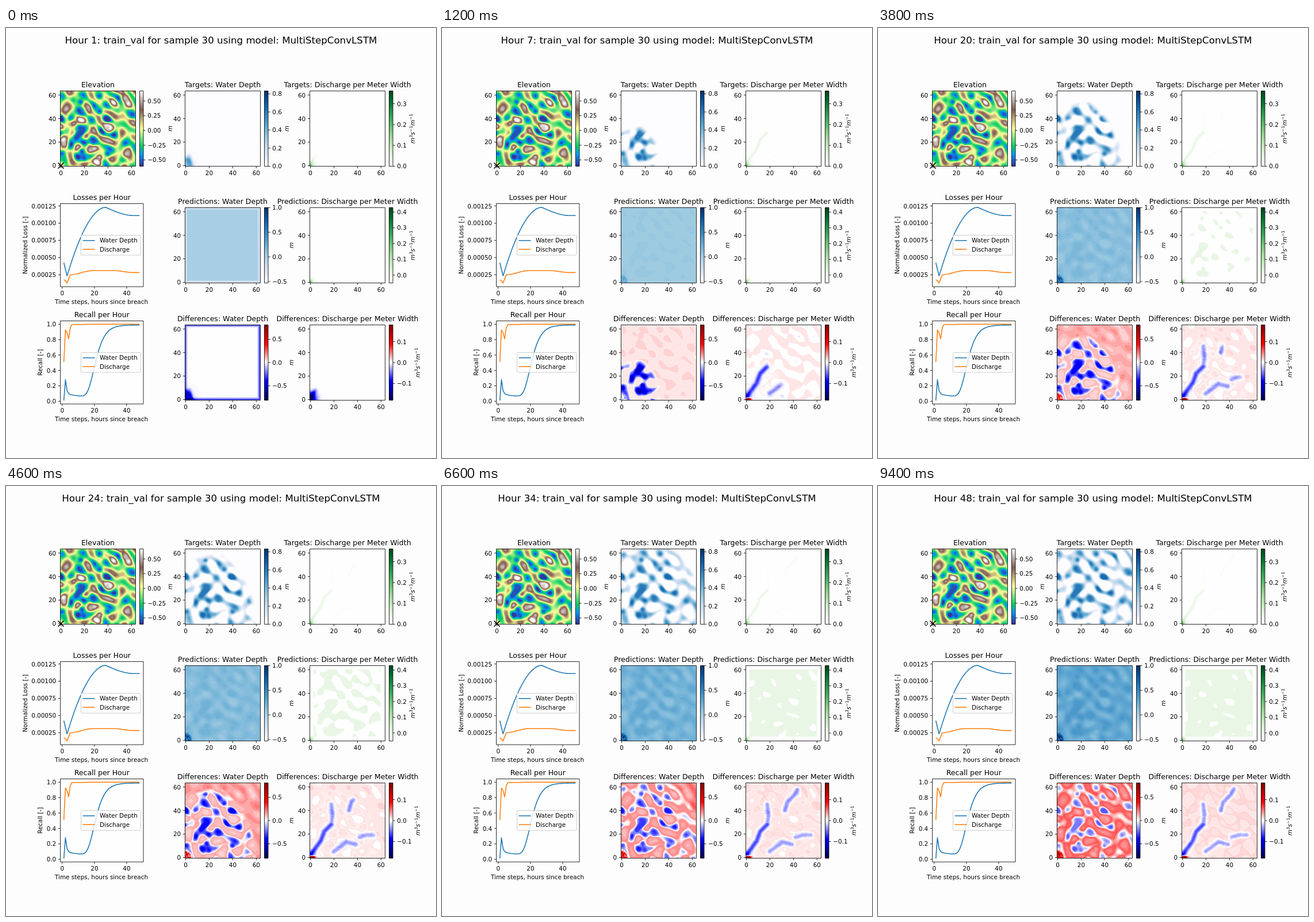
Write an HTML page with a canvas that moves like this. It is 748 by 748 pixels and loops after 9.6 s.

```html
<!DOCTYPE html>
<html lang="en">
<head>
<meta charset="utf-8">
<style>
html, body { margin: 0; width: 100%; height: 100%; overflow: hidden; background: #fdfdfd; }
canvas { display: block; }
</style>
</head>
<body>
<canvas id="stage" width="748" height="748"></canvas>
<script>
const ctx = document.getElementById('stage').getContext('2d');
const N = 131, CELLS = 64, HOUR_MS = 200, HOURS = 48;
const FONT = '"DejaVu Sans", sans-serif';
const SMALL = 10.42, MEDIUM = 12.5, LARGE = 16.67;
const THIN = .83, THICK = 1.56;
const BLUE = '#1f77b4', ORANGE = '#ff7f0e';

const clamp = (v, lo = 0, hi = 1) => Math.min(hi, Math.max(lo, v));
const ease = u => { u = clamp(u); return u * u * (3 - 2 * u); };
const quantise = (v, step) => Math.round(v / step) * step;
const blob = (x, y, rx, ry = rx) => Math.exp(-((x / rx) ** 2) - (y / ry) ** 2);

let seed = 30;
function random() {
  seed = (seed * 1664525 + 1013904223) % 4294967296;
  return seed / 4294967296;
}

// Terrain: band-limited noise, pinned at the main basins and summits.
const waves = Array.from({ length: 24 }, () => {
  const angle = random() * Math.PI, k = 2 * Math.PI / (9 + 5 * random());
  return { kx: k * Math.cos(angle), ky: k * Math.sin(angle), phase: random() * 2 * Math.PI };
});
const basins = [[13, 23], [16, 27], [19, 30], [18, 12], [20, 6], [40, 10], [18, 46], [17, 54], [33, 46], [9, 40], [1, 10], [28, 20], [33, 59], [55, 19], [61, 43]];
const summits = [[5, 48], [33, 7], [55, 57], [40, 32], [56, 10], [3, 18], [11, 36], [25, 13], [23, 49]];

function terrainHeight(x, y) {
  const near = spots => spots.reduce((sum, [sx, sy]) => sum + blob(x - sx, y - sy, 3.5), 0);
  const low = near(basins), high = near(summits);
  const noise = waves.reduce((sum, w) => sum + Math.cos(w.kx * x + w.ky * y + w.phase), 0) * .085;
  return clamp(noise * (1 - clamp(low + high)) + .55 * (Math.min(high, 1.1) - Math.min(low, 1)), -.6, .66);
}

const channels = [
  { strength: .075, path: [[1, 3], [9, 14], [12, 22], [18, 28]] },
  { strength: .045, path: [[18, 28], [19, 36], [18, 45]] },
  { strength: .045, path: [[20, 5], [31, 13], [39, 11]] },
  { strength: .05, path: [[33, 40], [35, 47], [41, 53], [44, 58]] },
  { strength: .04, path: [[42, 17], [48, 19], [55, 19]] }
];
function segmentDistance(x, y, [x1, y1], [x2, y2]) {
  const dx = x2 - x1, dy = y2 - y1;
  const u = clamp(((x - x1) * dx + (y - y1) * dy) / (dx * dx + dy * dy));
  return Math.hypot(x - x1 - u * dx, y - y1 - u * dy);
}
function flowAt(x, y) {
  return Math.max(...channels.map(({ strength, path }) => {
    const distance = Math.min(...path.slice(1).map((end, i) => segmentDistance(x, y, path[i], end)));
    return strength * blob(distance, 0, 2.1);
  }));
}

const speckles = Array.from({ length: CELLS * CELLS }, random);
const points = [];
for (let j = 0; j < N; j++) for (let i = 0; i < N; i++) {
  const x = (i + .5) * CELLS / N - .5, y = (N - j - .5) * CELLS / N - .5;
  const border = Math.min(x + .5, y + .5, CELLS - .5 - x, CELLS - .5 - y);
  points.push({
    x, y, border,
    elevation: terrainHeight(x, y),
    flow: flowAt(x, y),
    reach: Math.hypot(1.12 * x, y) + .3 * Math.max(0, y - 2 * x),
    speckle: speckles[Math.floor(y + .5) * CELLS + Math.floor(x + .5)]
  });
}

function simulate({ x, y, border, elevation, flow, reach, speckle }, hour) {
  const age = (hour - 1) / (HOURS - 1);
  const early = Math.exp(-(hour - 1) / 2);
  const front = 9 + 27 * ((hour - 1) / 6) ** .55;
  const wet = ease((front - reach) / 7 + .5);

  const depth = Math.max(0, .05 - elevation) * wet + .28 * blob(x, y, 4.5, 3.5) + .13 * early * blob(x, y, 7, 8);
  const splash = ease((hour - 1) / 14) * ease((7.5 - Math.hypot(1.2 * x, y)) / 3) * (.4 + .6 * speckle);
  const edge = early * clamp(1 - border / 2.4);
  const depthGuess = quantise(.01 + .27 * age - .2 * age ** .8 * elevation + .73 * splash - .35 * edge, .035);

  const discharge = Math.max(0, flow - .04) * wet + .12 * blob(x, y, 3.4) + .1 * blob(x, y, 1.4);
  const threshold = .9 - 1.3 * ease((hour - 8) / 28);
  const patch = border > 3.5 && -elevation > threshold;
  const dischargeGuess = (patch ? .05 : 0) + .15 * blob(x, y, 3) + .12 * blob(x, y, 1.5) - .05;

  const bias = quantise(.012 * age ** .6 - .012 * elevation * (1 - early), .008);
  const redSpot = .3 * (1 - early) * blob(x - 1.5, y, 2.6, 1.2);
  const dischargeError = bias + redSpot - wet * (flow + .012 * Math.max(0, -elevation))
    - .16 * blob(x, y, 5) * (.3 + .7 * early);
  return { elevation, depth, depthGuess, discharge, dischargeGuess, depthError: depthGuess - depth, dischargeError };
}

function colormap(stops) {
  const parsed = stops.map(([t, hex]) => [t, ...[0, 2, 4].map(i => parseInt(hex.slice(i, i + 2), 16))]);
  return t => {
    t = clamp(t);
    let i = 0;
    while (i < parsed.length - 2 && t > parsed[i + 1][0]) i++;
    const a = parsed[i], b = parsed[i + 1], u = (t - a[0]) / (b[0] - a[0]);
    return [1, 2, 3].map(k => Math.round(a[k] + (b[k] - a[k]) * u));
  };
}
const evenly = text => {
  const colors = text.split(' ');
  return colormap(colors.map((hex, i) => [i / (colors.length - 1), hex]));
};
const blues = evenly('fdfdff e0e8f5 c6dbef 9ecae1 6baed6 4292c6 2171b5 08519c 08306b');
const greens = evenly('fdfefd e5f5e0 c7e9c0 a1d99b 74c476 41ab5d 238b45 006d2c 00441b');
const seismic = evenly('00004c 0000ff fefefe ff0000 800000');
const terrain = colormap([[0, '333399'], [.15, '0099ff'], [.25, '00cc66'], [.5, 'ffff99'], [.75, '805c54'], [1, 'ffffff']]);

function text(str, x, y, size = SMALL, align = 'center') {
  ctx.font = `${size}px ${FONT}`;
  ctx.textAlign = align;
  ctx.fillStyle = '#000';
  ctx.fillText(str, x, y);
}
function vertical(x, y, draw) {
  ctx.save();
  ctx.translate(x, y);
  ctx.rotate(-Math.PI / 2);
  draw();
  ctx.restore();
}
function polyline(pts, color = '#000', width = THIN) {
  ctx.strokeStyle = color;
  ctx.lineWidth = width;
  ctx.lineJoin = 'round';
  ctx.beginPath();
  pts.forEach(([x, y]) => ctx.lineTo(x, y));
  ctx.stroke();
}
function frame(x, y, w, h) {
  ctx.strokeStyle = '#000';
  ctx.lineWidth = THIN;
  ctx.strokeRect(x, y, w, h);
}
function xTick(x, y, label) {
  polyline([[x, y], [x, y + 3.6]]);
  text(label, x, y + 15.4);
}
function yTick(x, y, label) {
  polyline([[x, y], [x - 3.6, y]]);
  text(label, x - 7.3, y + 3.9, SMALL, 'right');
}
const signed = (v, digits) => v.toFixed(digits).replace('-', '\u2212');
function multiples(step, lo, hi) {
  const list = [];
  for (let i = Math.ceil(lo / step); i * step <= hi; i++) list.push(i * step);
  return list;
}

// In a unit, "^" raises the part that follows it.
function unitLabel(unit, x, y) {
  const parts = unit.split(' ').map(part => {
    const raised = part[0] === '^';
    const font = raised ? `${SMALL * .7}px ${FONT}` : `italic ${SMALL}px ${FONT}`;
    ctx.font = font;
    const str = part.replace('^', '');
    return { str, font, rise: raised ? 4 : 0, width: ctx.measureText(str).width };
  });
  vertical(x, y, () => {
    ctx.textAlign = 'left';
    ctx.fillStyle = '#000';
    let left = -parts.reduce((sum, p) => sum + p.width, 0) / 2;
    for (const p of parts) {
      ctx.font = p.font;
      ctx.fillText(p.str, left, 4 - p.rise);
      left += p.width;
    }
  });
}

const METRE = 'm', FLOW = 'm ^3 s ^\u22121 m ^\u22121';
const width = 'Discharge per Meter Width';
const panels = [
  { field: 'elevation', title: 'Elevation', col: 0, row: 0, map: terrain, lo: -.607, hi: .67, step: .25, digits: 2, unit: METRE, unitX: 285 },
  { field: 'depth', title: 'Targets: Water Depth', col: 1, row: 0, map: blues, lo: 0, hi: .832, step: .2, unit: METRE, unitX: 488 },
  { field: 'discharge', title: `Targets: ${width}`, col: 2, row: 0, map: greens, lo: 0, hi: .361, step: .1, unit: FLOW, unitX: 707 },
  { field: 'depthGuess', title: 'Predictions: Water Depth', col: 1, row: 1, map: blues, lo: -.53, hi: 1, step: .5, unit: METRE, unitX: 496 },
  { field: 'dischargeGuess', title: `Predictions: ${width}`, col: 2, row: 1, map: greens, lo: -.05, hi: .428, step: .1, unit: FLOW, unitX: 707 },
  { field: 'depthError', title: 'Differences: Water Depth', col: 1, row: 2, map: seismic, lo: -.81, hi: .81, step: .5, unit: METRE, unitX: 496 },
  { field: 'dischargeError', title: `Differences: ${width}`, col: 2, row: 2, map: seismic, lo: -.18, hi: .18, step: .1, unit: FLOW, unitX: 716 }
];
for (const p of panels) {
  p.x = 94 + 217 * p.col;
  p.y = Math.floor(109 + 203.5 * p.row);
  p.image = ctx.createImageData(N, N);
  p.palette = Array.from({ length: 257 }, (_, i) => p.map(i / 256));
}

function drawPanel(p, cells) {
  const share = v => clamp((v - p.lo) / (p.hi - p.lo));
  cells.forEach((cell, i) => {
    p.image.data.set([...p.palette[Math.round(share(cell[p.field]) * 256)], 255], i * 4);
  });
  ctx.putImageData(p.image, p.x, p.y);

  const left = p.x + .5, top = p.y + .5, bottom = top + N;
  frame(left, top, N, N);
  text(p.title, left + N / 2, top - 6.5, MEDIUM);
  for (const v of multiples(20, 0, 60)) {
    const offset = (v + .5) * N / CELLS;
    xTick(left + offset, bottom, v);
    yTick(left, bottom - offset, v);
  }

  const barX = left + 138, barWidth = 6.5;
  for (let i = 0; i < N; i++) {
    ctx.fillStyle = `rgb(${p.map(1 - i / (N - 1))})`;
    ctx.fillRect(barX, p.y + i, barWidth, 1.5);
  }
  frame(barX, top, barWidth, N);
  for (const v of multiples(p.step, p.lo, p.hi)) {
    const y = bottom - share(v) * N;
    polyline([[barX + barWidth, y], [barX + barWidth + 3.6, y]]);
    text(signed(v, p.digits || 1), barX + barWidth + 7.3, y + 3.9, SMALL, 'left');
  }
  unitLabel(p.unit, p.unitX, top + N / 2);
}

function depthLoss(h) {
  if (h <= 3) return .000425 - .0000955 * (h - 1);
  if (h <= 27) return .00123 - .001 * (1 - (h - 3) / 24) ** 1.9;
  return .00123 - .00012 * Math.sin(Math.PI / 2 * clamp((h - 27) / 18));
}
const dischargeLoss = h => .00013 + .000046 * (1 - clamp((h - 1) / 2) ** 1.6) + .00012 * clamp((h - 3) / 2)
  + .00006 * ease((h - 5) / 14) - .000028 * ease((h - 32) / 12);
function depthRecall(h) {
  if (h === 1) return .01;
  const start = .065 + .045 * Math.exp(-(h - 2) / 4) + .17 * Math.exp(-(h - 2) * 1.5);
  return start + (.99 - start) * Math.exp(-Math.exp((19.5 - h) / 3.8));
}
const firstRecalls = [.51, .925, .89, .81, .955];
const dischargeRecall = h => firstRecalls[h - 1] ?? .996 + .004 * ease((h - 10) / 10);

const charts = [
  { title: 'Losses per Hour', label: 'Normalized Loss [-]', labelX: 37, y: 305.5, legendY: 360.5,
    step: .00025, lo: .0002, hi: .0013, digits: 5, zero: 459.1, scale: 119600, blue: depthLoss, orange: dischargeLoss },
  { title: 'Recall per Hour', label: 'Recall [-]', labelX: 63, y: 509.5, legendY: 564.5,
    step: .2, lo: 0, hi: 1.01, digits: 1, zero: 649.3, scale: 134, blue: depthRecall, orange: dischargeRecall }
];

function drawChart(c) {
  const left = 94.5, size = 144.5, bottom = c.y + size;
  const hourX = h => 97.8 + h * 2.804, valueY = v => c.zero - v * c.scale;
  ctx.fillStyle = '#fefefe';
  ctx.fillRect(left, c.y, size, size);
  const hours = Array.from({ length: HOURS }, (_, i) => i + 1);
  polyline(hours.map(h => [hourX(h), valueY(c.blue(h))]), BLUE, THICK);
  polyline(hours.map(h => [hourX(h), valueY(c.orange(h))]), ORANGE, THICK);
  frame(left, c.y, size, size);
  text(c.title, left + size / 2, c.y - 6.5, MEDIUM);
  for (const h of multiples(20, 0, 40)) xTick(hourX(h), bottom, h);
  for (const v of multiples(c.step, c.lo, c.hi)) yTick(left, valueY(v), v.toFixed(c.digits));
  text('Time steps, hours since breach', 166, bottom + 29.7);
  vertical(c.labelX, c.y + size / 2, () => text(c.label, 0, 0));

  ctx.beginPath();
  ctx.roundRect(130.5, c.legendY, 103.5, 34.5, 2);
  ctx.fillStyle = 'rgba(255,255,255,.8)';
  ctx.fill();
  ctx.strokeStyle = '#ccc';
  ctx.lineWidth = 1;
  ctx.stroke();
  [['Water Depth', BLUE], ['Discharge', ORANGE]].forEach(([name, color], i) => {
    const y = c.legendY + 9.2 + i * 15.2;
    polyline([[133.5, y], [154.5, y]], color, THICK);
    text(name, 163, y + 3.7, SMALL, 'left');
  });
}

function render(hour) {
  ctx.fillStyle = '#fdfdfd';
  ctx.fillRect(0, 0, 748, 748);
  const cells = points.map(p => simulate(p, hour));
  panels.forEach(p => drawPanel(p, cells));
  polyline([[90.5, 234.5], [100.5, 244.5]], '#000', THICK);
  polyline([[90.5, 244.5], [100.5, 234.5]], '#000', THICK);
  charts.forEach(drawChart);
  text(`Hour ${hour}: train_val for sample 30 using model: MultiStepConvLSTM`, 374, 27, LARGE);
}

let shown = 0;
function tick() {
  const hour = Math.floor(performance.now() / HOUR_MS) % HOURS + 1;
  if (hour !== shown) render(shown = hour);
  requestAnimationFrame(tick);
}
tick();
</script>
</body>
</html>
```
